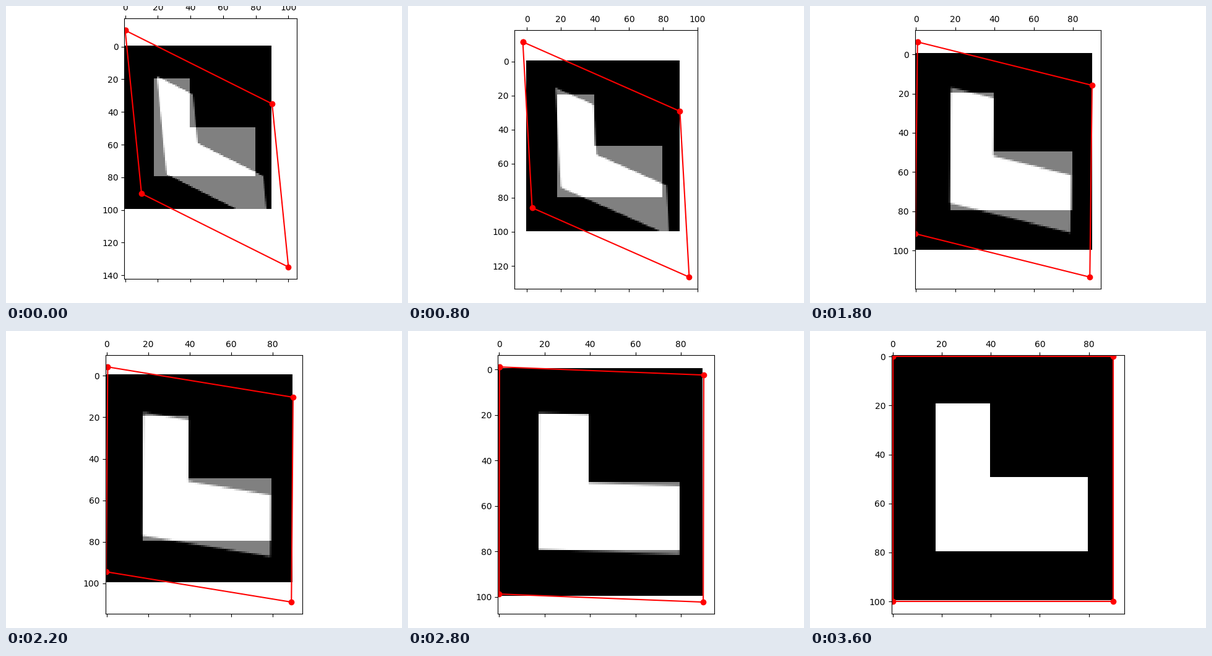
These frames come from a looping animation (640x480 px, 4.2 s). A matplotlib script:

```python
import numpy as np
import matplotlib.pyplot as plt
from matplotlib.animation import FuncAnimation

W, H, DPI = 640, 480, 100
ROWS, COLS = 100, 90
FRAMES, LAST, INTERVAL = 21, 18, 200

# Key poses of the fit: top-left, top-right, bottom-left corner.
# Each iteration moves evenly from one pose to the next.
REST = [(0, 0), (COLS, 0), (0, ROWS)]
POSES = {
    0: [(0, -10), (90, 35), (10, 90)],
    4: [(-2.36, -11.4), (89.8, 29.25), (3.1, 85.9)],
    6: [(-1.1, -9.3), (91.2, 25.1), (-0.2, 86.9)],
    9: [(0.75, -6.3), (89.7, 15.8), (-0.4, 91.4)],
    13: [(0.35, -2.2), (90, 4.9), (-0.1, 97.5)],
    15: REST,
}

template = np.zeros((ROWS, COLS))
template[20:80, 18:40] = 1
template[50:80, 18:80] = 1
grid_y, grid_x = np.mgrid[0:ROWS, 0:COLS].astype(float)


def corners(step):
    keys = list(POSES)
    poses = np.array(list(POSES.values()), float).reshape(len(keys), -1)
    vals = [np.interp(step, keys, col) for col in poses.T]
    return np.reshape(vals, (3, 2))


def bilinear(img, x, y):
    """Sample img at (x, y), zero outside."""
    pad = np.pad(img, 2)
    x = np.clip(x + 2, 0, COLS + 2)
    y = np.clip(y + 2, 0, ROWS + 2)
    x0, y0 = x.astype(int), y.astype(int)
    fx, fy = x - x0, y - y0
    top = pad[y0, x0] * (1 - fx) + pad[y0, x0 + 1] * fx
    low = pad[y0 + 1, x0] * (1 - fx) + pad[y0 + 1, x0 + 1] * fx
    return top * (1 - fy) + low * fy


def warped(tl, tr, bl):
    """Template carried along by the affine map of its corners."""
    affine = np.column_stack([(tr - tl) / COLS, (bl - tl) / ROWS])
    inv = np.linalg.inv(affine)
    dx, dy = grid_x - tl[0], grid_y - tl[1]
    return bilinear(template,
                    inv[0, 0] * dx + inv[0, 1] * dy,
                    inv[1, 0] * dx + inv[1, 1] * dy)


def place(left, top, right, bottom):
    """Axes box from pixel edges measured from the top left."""
    ax.set_position([left / W, 1 - bottom / H,
                     (right - left) / W, (bottom - top) / H])


fig = plt.figure(figsize=(W / DPI, H / DPI), dpi=DPI)
ax = fig.add_subplot()


def draw(i):
    step = min(i, LAST)
    ax.clear()
    # The layout settles after the first picture.
    if step == 0:
        place(47, 20.2, 614, 441)
    else:
        place(15, 39.1, 625, 457.1)
    tl, tr, bl = corners(step)
    blend = (template + warped(tl, tr, bl)) / 2
    ax.matshow(blend, cmap="gray", vmin=0, vmax=1)
    loop = np.array([tl, tr, tr + bl - tl, bl, tl])
    ax.plot(loop[:, 0], loop[:, 1], "ro-")


anim = FuncAnimation(fig, draw, frames=FRAMES, interval=INTERVAL,
                     repeat=True, repeat_delay=0)
plt.show()
```
